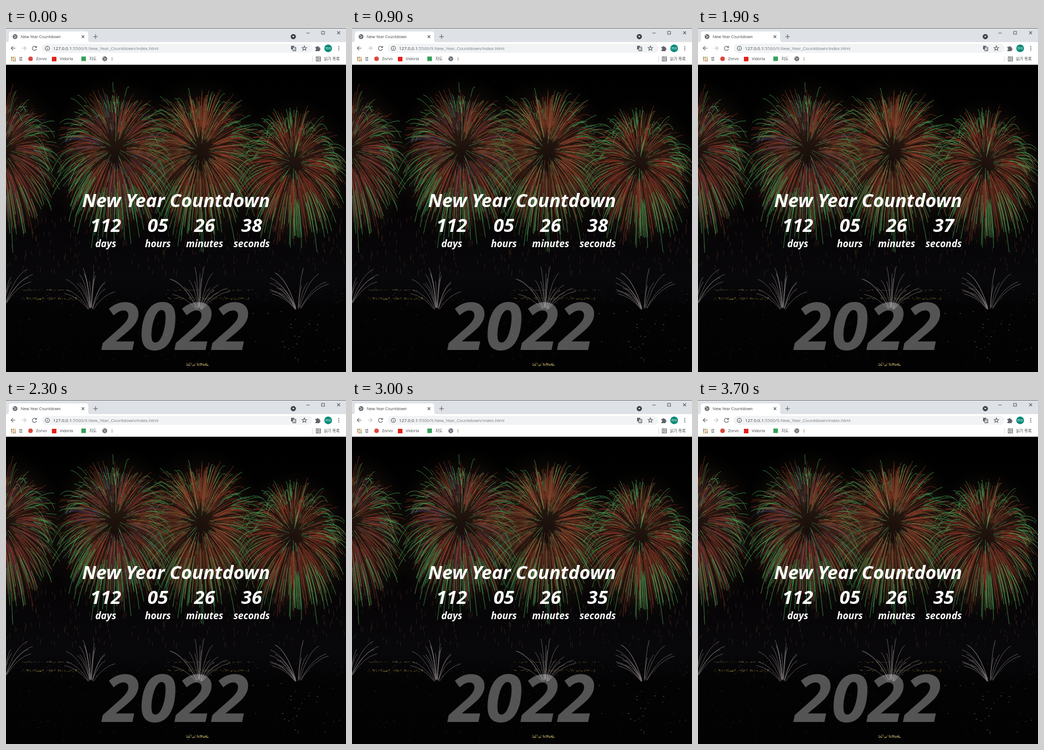
These frames come from a looping animation (600x609 px, 3800 ms). An HTML page:

```html
<!DOCTYPE html>
<html lang="ko">
<head>
<meta charset="utf-8">
<title>New Year Countdown</title>
<style>
  html, body { margin: 0; width: 100%; height: 100%; overflow: hidden; background: #000; }
  svg { display: block; width: 600px; height: 609px; }
  text { font-family: "Open Sans", "Noto Sans CJK KR", "Noto Sans CJK", sans-serif; }
  .ui { font-size: 7.05px; fill: #3c4043; }
  .hero { font-weight: 700; font-style: italic; text-anchor: middle; fill: #fff; }
  .big { font-size: 33px; }
  .label { font-size: 17px; }
  .year { font-size: 117px; opacity: .32; }
  .line { fill: none; stroke: #5f6368; stroke-width: 1.1; }
</style>
</head>
<body>
<svg viewBox="0 0 600 609">
  <defs>
    <clipPath id="page"><rect y="65" width="600" height="544"/></clipPath>
    <linearGradient id="night" x1="0" y1="0" x2="0" y2="1">
      <stop offset="0" stop-color="#000"/>
      <stop offset=".45" stop-color="#050304"/>
      <stop offset=".7" stop-color="#08070a"/>
      <stop offset=".8" stop-color="#030304"/>
      <stop offset="1" stop-color="#020203"/>
    </linearGradient>
    <radialGradient id="glow">
      <stop offset="0" stop-color="#24150f" stop-opacity=".6"/>
      <stop offset=".35" stop-color="#402619" stop-opacity=".6"/>
      <stop offset=".65" stop-color="#2c1c12" stop-opacity=".5"/>
      <stop offset="1" stop-color="#10120a" stop-opacity="0"/>
    </radialGradient>
    <g id="globe">
      <circle r="4.2" fill="#5f6368"/>
      <path d="M-3-1.4Q-1-2.8 0-1T2.6-1M-2 2Q0 0 1.6 2.4" fill="none" stroke="#fff" stroke-width="1"/>
    </g>
  </defs>

  <g clip-path="url(#page)">
    <rect y="65" width="600" height="544" fill="url(#night)"/>
    <g id="scene" fill="none" stroke-linecap="round"></g>
  </g>

  <text class="hero year" x="300" y="570">2022</text>
  <text class="hero big" x="300" y="317">New Year Countdown</text>
  <g id="counter"></g>

  <rect width="600" height="65" fill="#fff"/>
  <rect width="600" height="25" fill="#dee1e6"/>
  <rect width="600" height="1" fill="#77797c"/>
  <path d="M1 25Q5 25 5 21V10Q5 6 9 6H141Q145 6 145 10V21Q145 25 149 25Z" fill="#fff"/>
  <use href="#globe" x="16" y="15.3"/>
  <text class="ui" x="26" y="18">New Year Countdown</text>
  <path class="line" d="M133.5 13l4.6 4.6m0-4.6l-4.6 4.6M154 15.3h8m-4-4v8"/>
  <circle cx="507" cy="15.3" r="4.6" fill="#3c4043"/>
  <path d="M505 14h4l-2 2.8Z" fill="#fff"/>
  <path class="line" stroke-width=".9" d="M530 9h6M557 6h5v5h-5ZM584.5 6l5 5m0-5l-5 5"/>

  <path class="line" d="M16.5 35.8H9.3m3.4-3.6l-3.6 3.6 3.6 3.6"/>
  <path class="line" style="stroke:#bcc0c4" d="M28 35.8h7.2m-3.4-3.6l3.6 3.6-3.6 3.6"/>
  <path class="line" d="M53.2 33.8A3.7 3.7 0 1 0 53.8 37M54 31.8v2.6h-2.8"/>
  <rect x="63" y="28" width="478" height="16" rx="8" fill="#f1f3f4"/>
  <circle class="line" cx="73" cy="36" r="3.7" stroke-width=".9"/>
  <path class="line" d="M73 35.5v2.6M73 33.5v1"/>
  <text class="ui" x="83" y="38.8" style="font-size:7.85px;fill:#777b80"><tspan fill="#3c4043">127.0.0.1</tspan>:5500/9.New_Year_Countdown/index.html</text>
  <rect x="503" y="31.5" width="5.5" height="6.5" rx=".8" fill="#5f6368"/>
  <rect class="line" x="506" y="34" width="5.5" height="6.5" rx=".8" stroke-width=".8" style="fill:#f1f3f4"/>
  <text x="507" y="39.4" font-size="4.5" fill="#5f6368">文</text>
  <path id="star" class="line" stroke-width=".9"/>
  <path d="M546 33.5h2.3a1.5 1.5 0 0 1 3 0h2.2v2.3a1.5 1.5 0 0 1 0 3V41H546v-2.2a1.5 1.5 0 0 0 0-3Z" fill="#5f6368"/>
  <circle cx="568.5" cy="36" r="6.8" fill="#078a78"/>
  <text x="568.5" y="38.2" font-size="6.5" fill="#fff" text-anchor="middle">mo</text>
  <g id="menu" fill="#5f6368"></g>

  <g id="apps"></g>
  <text class="ui" x="22.5" y="57.4">앱</text>
  <circle cx="43.3" cy="54.5" r="4" fill="#d9473b"/>
  <text class="ui" x="53" y="57.2">Zorvo</text>
  <rect x="81" y="51" width="8" height="8" fill="#e3211c"/>
  <text class="ui" x="95" y="57.2">Vidorla</text>
  <rect x="133" y="50.5" width="8" height="8" fill="#36a05a"/>
  <text class="ui" x="147" y="57.4">지도</text>
  <use href="#globe" x="174.3" y="54.5"/>
  <rect x="186.6" y="51.5" width="1" height="6.5" fill="#b58a62"/>
  <path d="M541 50v10" stroke="#d5d8dc"/>
  <path class="line" stroke-width=".9" d="M547.5 51h7.5v7.5h-7.5Zm2.5 0v7.5m0-5h5m-5 2.5h5"/>
  <text class="ui" x="561" y="57.4">읽기 목록</text>
</svg>

<script>
const $ = id => document.getElementById(id);

function add(parent, tag, attrs, text = "") {
  const el = document.createElementNS("http://www.w3.org/2000/svg", tag);
  for (const name in attrs) el.setAttribute(name, attrs[name]);
  el.textContent = text;
  parent.append(el);
  return el;
}

let seed = 2022;
function random(min = 0, max = 1) {
  seed = (seed * 1664525 + 1013904223) % 4294967296;
  return min + (max - min) * seed / 4294967296;
}
const point = (x, y) => `${x.toFixed(1)} ${y.toFixed(1)}`;

// A spark leaves the centre and falls over at the end of its flight.
function spark(cx, cy, size, inner, outer) {
  const angle = random(0, 2 * Math.PI);
  const reach = size * random(.7, 1);
  const dx = Math.cos(angle) * reach, dy = Math.sin(angle) * reach * 1.22;
  const fall = random(12, 48);
  const at = t => [cx + dx * (1.5 * t - .5 * t * t), cy + dy * (1.5 * t - .5 * t * t) + fall * t ** 3];
  const mid = (inner + outer) / 2;
  const [a, b, c] = [inner, mid, outer].map(at);
  const control = [0, 1].map(i => 2 * b[i] - (a[i] + c[i]) / 2);
  return `M${point(...a)}Q${point(...control)} ${point(...c)}`;
}

function streaks(count, make, stroke, width, opacity) {
  const d = Array.from({ length: count }, make).join("");
  add($("scene"), "path", { d, stroke, "stroke-width": width, opacity });
}

function burst(cx, cy, size, tint, warmth) {
  add($("scene"), "ellipse", { cx, cy: cy + 20, rx: size * 1.05, ry: size * 1.3, fill: "url(#glow)" });
  const layer = (count, color, from, to, width, opacity) => streaks(count,
    () => spark(cx, cy, size, random(from, from + .25), random(to - .25, to)), color, width, opacity);
  layer(70, tint, .12, .9, .9, .6);
  layer(warmth, "#8a5835", .1, .9, .9, .6);
  layer(150, "#a33a2a", .15, 1, .9, .6);
  layer(150, "#429a52", .4, 1.08, 1, .75);
  layer(34, "#51ad62", .06, .4, .9, .6);
}

function fountain(cx, cy) {
  streaks(17, () => {
    const lean = random(-1.05, 1.05), reach = random(45, 82);
    const x = Math.sin(lean) * reach * .9, y = -Math.cos(lean) * reach;
    return `M${point(cx + x * .1, cy + y * .12)}Q${point(cx + x * .5, cy + y * .85)} ${point(cx + x, cy + y)}`;
  }, "#9a918f", .85, .65);
}

function lights(count, x0, x1, y0, y1, color, opacity) {
  streaks(count, () => `M${point(random(x0, x1), random(y0, y1))}h${random(.2, 1.6).toFixed(1)}`, color, 1, opacity);
}

function drawScene() {
  burst(-8, 215, 114, "#45406f", 90);
  burst(343, 217, 117, "#a0683e", 170);
  burst(193, 213, 115, "#45406f", 100);
  burst(507, 238, 104, "#752d24", 80);

  streaks(260, () => {
    const x = random(0, 600), y = random(325, 430);
    return `M${point(x, y)}l${point(random(-2, 2), random(3, 10))}`;
  }, "#65452f", .8, .5);

  for (const [x0, x1] of [[28, 125], [285, 430]]) {
    lights(50, x0, x1, 463, 465, "#75683a", .5);
    lights(75, x0, x1, 477, 481, "#8b7a35", .6);
  }
  lights(70, 0, 600, 458, 490, "#77614a", .45);
  lights(70, 0, 600, 495, 605, "#565a60", .4);
  lights(26, 430, 590, 500, 590, "#a5aaa6", .55);
  lights(70, 318, 356, 593, 598, "#a3935a", .75);
  for (const x of [-4, 150, 341, 515]) fountain(x, x < 0 ? 492 : 502);
}

function drawToolbar() {
  let star = "";
  for (let i = 0; i < 10; i++) {
    const r = i % 2 ? 1.9 : 4.3, a = i * Math.PI / 5;
    star += (i ? "L" : "M") + point(526.5 + r * Math.sin(a), 36 - r * Math.cos(a));
  }
  $("star").setAttribute("d", star + "Z");
  for (const cy of [33, 36, 39]) add($("menu"), "circle", { cx: 587.3, cy, r: .9 });
  const colors = ["#e2554a", "#3c9b5b", "#e5ad2f"];
  for (let i = 0; i < 9; i++) {
    const col = i % 3, row = (i - col) / 3;
    add($("apps"), "rect", { x: 9 + col * 3, y: 51 + row * 3, width: 2, height: 2, fill: colors[(col + row) % 3] });
  }
}

function drawCounter() {
  const units = [["days", 176, "112"], ["hours", 268, "05"], ["minutes", 350.5, "26"], ["seconds", 433.5, "38"]];
  return units.map(([name, x, value]) => {
    add($("counter"), "text", { class: "hero label", x, y: 388 }, name);
    return add($("counter"), "text", { class: "hero big", x, y: 361 }, value);
  }).pop();
}

const LOOP = 3800;
drawScene();
drawToolbar();
const seconds = drawCounter();
const start = performance.now();

function render(now) {
  const time = Math.max(0, now - start) % LOOP;
  seconds.textContent = 38 - Math.floor(time / 1000);
  requestAnimationFrame(render);
}
render(start);
</script>
</body>
</html>
```
